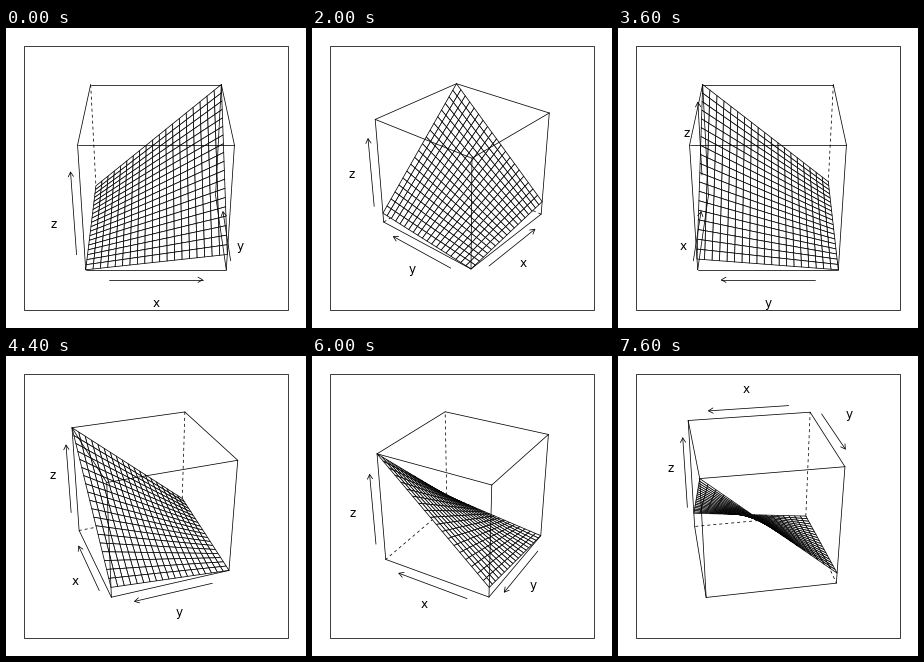
Recreate the animation shown at these times as a matplotlib script. Size 300 px wide and 300 px high, loop 8000 ms.

```python
import itertools

import matplotlib.pyplot as plt
import numpy as np
from matplotlib.animation import FuncAnimation
from matplotlib.collections import PolyCollection
from matplotlib.patches import Rectangle

SIZE, MARGIN, DPI = 300, 18, 100
PX = 72 / DPI
LINE = 0.75 * PX
FRAMES, INTERVAL, STEP = 20, 400, 10
TILT = np.radians(-60)
EYE = 5.0
FILL = 0.8
PADDING = 1.14
CELLS = 19
ARROW_SCALE, LABEL_SCALE, ARROW_HALF = 1.1, 4 / 3, 0.33
HEAD = 0.02 * (SIZE - 2 * MARGIN)

CORNERS = np.array(list(itertools.product((-0.5, 0.5), repeat=3)))
EDGES = [(a, b) for a, b in itertools.combinations(range(8), 2)
         if np.count_nonzero(CORNERS[a] != CORNERS[b]) == 1]


def make_facets():
    u = np.linspace(0, 1, CELLS + 1)
    x, y = np.meshgrid(u, u, indexing="ij")
    rise_x, rise_y = 0.135, 0.095
    z = rise_x * x + rise_y * y + (1 - rise_x - rise_y) * x * y
    p = np.stack([x, y, z], axis=-1) - 0.5
    quads = np.stack([p[:-1, :-1], p[1:, :-1], p[1:, 1:], p[:-1, 1:]], axis=2)
    return quads.reshape(-1, 4, 3)


FACETS = make_facets()


def rotate(points, angle):
    x, y, z = np.moveaxis(np.asarray(points, float), -1, 0)
    c, s = np.cos(angle), np.sin(angle)
    x, y = x * c - y * s, x * s + y * c
    c, s = np.cos(TILT), np.sin(TILT)
    return np.stack([x, y * c - z * s, y * s + z * c], axis=-1)


def flatten(points, angle):
    p = rotate(points, angle)
    return p[..., :2] / (EYE - p[..., 2:])


def make_camera(angle):
    """Return a projection to pixels that fits the box into the panel."""
    box = flatten(CORNERS, angle)
    low, high = box.min(axis=0), box.max(axis=0)
    scale = (SIZE - 2 * MARGIN) * FILL / PADDING / (high - low).max()
    center = (low + high) / 2 / FILL

    def project(points):
        offset = (flatten(points, angle) - center) * scale
        return SIZE / 2 + offset * (1, -1)

    return project


def far_corner(n):
    """Signs of x and y at the hidden bottom corner."""
    if n == 0:
        return -1, 1
    if n < 9:
        return 1, 1
    return (1, -1) if n < 19 else (-1, -1)


def axis_sides(fx, fy):
    """Box edge beside which each axis arrow runs, as signs; 0 is its own axis."""
    if (fx, fy) == (-1, -1):
        return {"x": (0, -1, 1), "y": (-1, 0, 1), "z": (1, -1, 0)}
    return {"x": (0, -fy, -1), "y": (-fx, 0, -1), "z": (-fy, fx, 0)}


fig = plt.figure(figsize=(SIZE / DPI, SIZE / DPI), dpi=DPI, facecolor="white")
ax = fig.add_axes([0, 0, 1, 1])
ax.set_xlim(0, SIZE)
ax.set_ylim(SIZE, 0)
ax.axis("off")

ax.add_patch(Rectangle((MARGIN, MARGIN), SIZE - 2 * MARGIN, SIZE - 2 * MARGIN,
                       fill=False, ec="black", lw=LINE))


def make_line(z, style="-"):
    return ax.plot([], [], color="black", lw=LINE, ls=style, zorder=z,
                   solid_capstyle="round")[0]


hidden = [make_line(1, (0, (4, 4))) for _ in range(3)]
surface = ax.add_collection(PolyCollection(
    [], facecolors="white", edgecolors="black", linewidths=LINE, zorder=2))
visible = [make_line(3) for _ in range(9)]
shafts = {name: make_line(4) for name in "xyz"}
heads = {name: make_line(4) for name in "xyz"}
labels = {name: ax.text(0, 0, name, family="DejaVu Sans", size=12 * PX,
                        ha="center", va="baseline", zorder=4) for name in "xyz"}


def draw_axis(name, side, project):
    side = np.array(side) / 2
    along = np.array([c == name for c in "xyz"]) * ARROW_HALF
    tail, tip = project([side * ARROW_SCALE - along, side * ARROW_SCALE + along])
    shafts[name].set_data(*zip(tail, tip))

    heading = np.arctan2(*(tail - tip)[::-1])
    barbs = [tip + HEAD * np.array([np.cos(a), np.sin(a)])
             for a in (heading - np.pi / 6, heading + np.pi / 6)]
    heads[name].set_data(*zip(barbs[0], tip, barbs[1]))

    x, y = project(side * LABEL_SCALE)
    labels[name].set_position((x, y + 3.3))


def draw(n):
    angle = np.radians(n * STEP)
    project = make_camera(angle)
    far = far_corner(n)

    box = project(CORNERS)
    far_index = int(np.argmin(np.abs(CORNERS * 2 - (*far, -1)).sum(axis=1)))
    back = [e for e in EDGES if far_index in e]
    front = [e for e in EDGES if far_index not in e]
    for line, (a, b) in zip(hidden + visible, back + front):
        line.set_data(*zip(box[a], box[b]))

    depth = rotate(FACETS, angle)[..., 2].mean(axis=1)
    surface.set_verts(project(FACETS[np.argsort(depth, kind="stable")]))

    for name, side in axis_sides(*far).items():
        draw_axis(name, side, project)
    return [*hidden, surface, *visible, *shafts.values(), *heads.values(),
            *labels.values()]


anim = FuncAnimation(fig, draw, frames=FRAMES, interval=INTERVAL,
                     repeat=True, repeat_delay=0, blit=False)
plt.show()
```
